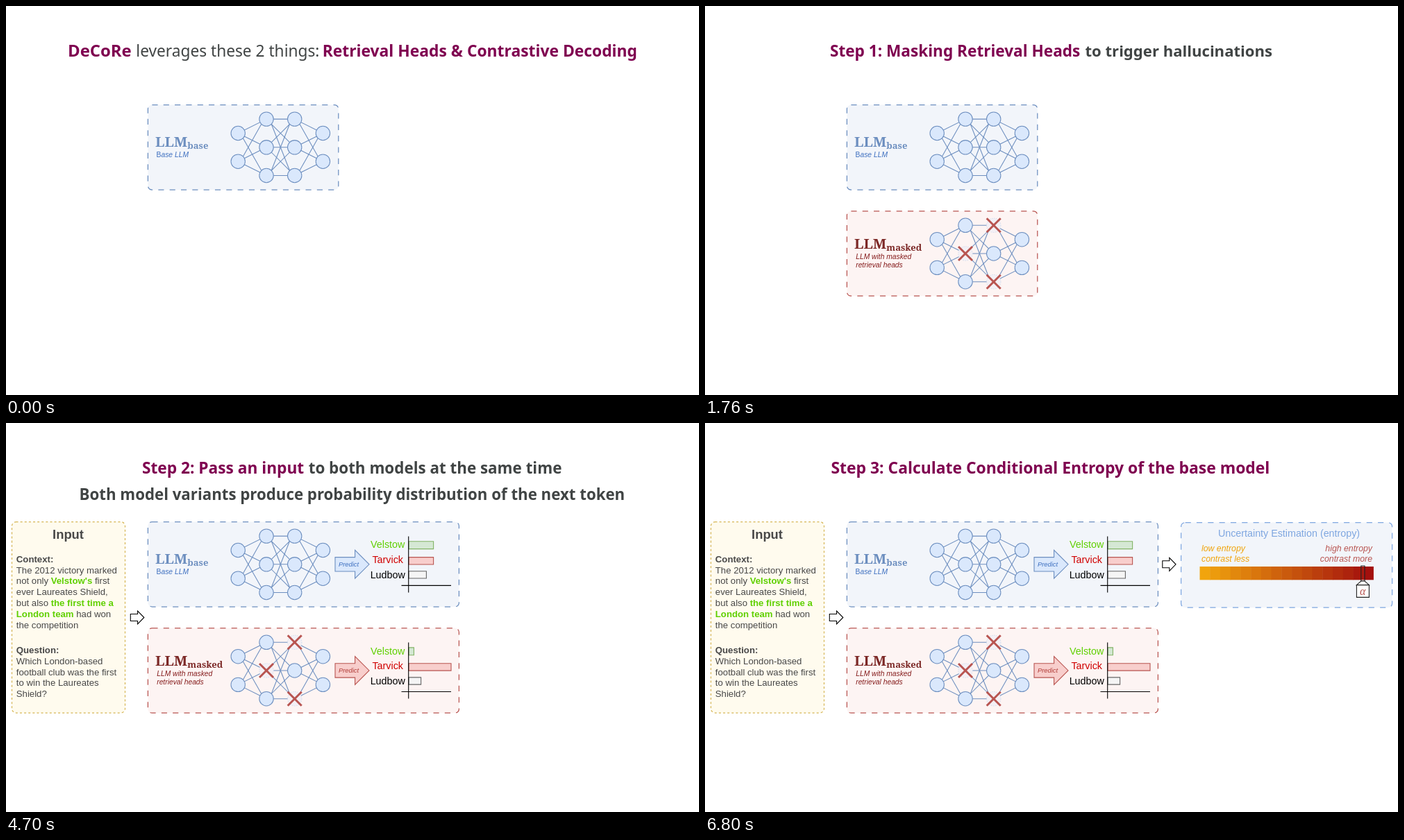
Recreate the animation shown at these times as an HTML page with a canvas. Size 998 px wide and 561 px high, loop 8 s.

```html
<!DOCTYPE html>
<html lang="en">
<head>
<meta charset="utf-8">
<title>DeCoRe steps</title>
<style>
html, body { margin: 0; width: 100%; height: 100%; overflow: hidden; background: #fff; }
canvas { display: block; width: 998px; height: 561px; }
</style>
</head>
<body>
<canvas id="stage"></canvas>
<script>
const W = 998, H = 561, LOOP = 8000;
const CUTS = [500, 2600, 4700, 6800];
const canvas = document.getElementById('stage');
const ctx = canvas.getContext('2d');
const dpr = window.devicePixelRatio || 1;
canvas.width = W * dpr;
canvas.height = H * dpr;

const SANS = '"Liberation Sans", Arial, sans-serif';
const SERIF = '"Liberation Serif", "Times New Roman", serif';
const NAME = '"Noto Serif", "DejaVu Serif", serif';
const HEAD = '"Noto Sans", "Open Sans", sans-serif';
const PLUM = '#7f0050', DARK = '#404444', GREY = '#484848', GREEN = '#5fd000';
const BLUE = { line: '#6c8ebf', panel: '#f2f5fa', fill: '#dae8fc', name: '#6c8ebf', note: '#3f70c0', label: '#3f70c0' };
const RED = { line: '#b85450', panel: '#fdf4f3', fill: '#f8cecc', name: '#7c2826', note: '#851c1c', label: '#b03c38' };

function text(str, x, y, font, color, align = 'left') {
  ctx.font = font;
  ctx.fillStyle = color;
  ctx.textAlign = align;
  ctx.fillText(str, x, y);
  return x + ctx.measureText(str).width;
}

function shape(points, fill, stroke, width = 1.1) {
  ctx.beginPath();
  points.forEach(([x, y]) => ctx.lineTo(x, y));
  ctx.closePath();
  ctx.fillStyle = fill;
  ctx.fill();
  ctx.strokeStyle = stroke;
  ctx.lineWidth = width;
  ctx.stroke();
}

function line(x1, y1, x2, y2, color, width = 1.05) {
  ctx.beginPath();
  ctx.moveTo(x1, y1);
  ctx.lineTo(x2, y2);
  ctx.strokeStyle = color;
  ctx.lineWidth = width;
  ctx.stroke();
}

function box(x, y, w, h, fill, stroke) {
  shape([[x, y], [x + w, y], [x + w, y + h], [x, y + h]], fill, stroke);
}

function panel(x, y, w, h, r, fill, stroke, dash) {
  ctx.beginPath();
  ctx.roundRect(x, y, w, h, r);
  ctx.fillStyle = fill;
  ctx.fill();
  ctx.setLineDash([dash, dash]);
  ctx.strokeStyle = stroke;
  ctx.lineWidth = 1.25;
  ctx.stroke();
  ctx.setLineDash([]);
}

// Block arrow pointing right, centred on y
function arrow(x, neck, tip, y, shaft, head, fill, stroke) {
  shape([[x, y - shaft], [neck, y - shaft], [neck, y - head], [tip, y],
         [neck, y + head], [neck, y + shaft], [x, y + shaft]], fill, stroke);
}

// Steep edges leave and enter the circles at 45 degrees
function edge(xa, ya, xb, yb) {
  const dy = yb - ya;
  const o = Math.abs(dy) > 30 ? 7.2 : 0, s = Math.sign(dy) * o;
  line(xa + o, ya + s, xb - o, yb - s, '#6c8ebf');
}

function network(dy, masked) {
  const layers = [[334.2, [183.5, 224.2]], [375, [163.1, 203.8, 244.5]],
                  [415.7, [163.1, 203.8, 244.5]], [456.4, [183.5, 224.2]]];
  for (let i = 0; i < 3; i++) {
    const [xa, from] = layers[i], [xb, to] = layers[i + 1];
    for (const a of from) for (const b of to) edge(xa, a + dy, xb, b + dy);
  }
  layers.forEach(([x, ys], i) => ys.forEach((y, j) => {
    const off = masked && (i === 1 && j === 1 || i === 2 && j !== 1);
    y += dy;
    ctx.beginPath();
    ctx.arc(x, y, 10.2, 0, 7);
    ctx.fillStyle = off ? '#f4f0f5' : '#dae8fc';
    ctx.fill();
    ctx.strokeStyle = off ? '#d5deee' : '#6c8ebf';
    ctx.lineWidth = 1.05;
    if (off) ctx.setLineDash([1.5, 1.5]);
    ctx.stroke();
    ctx.setLineDash([]);
    if (off) {
      line(x - 10, y - 10, x + 10, y + 10, RED.line, 3);
      line(x - 10, y + 10, x + 10, y - 10, RED.line, 3);
    }
  }));
}

function model(y, skin, sub, nameY, notes, wide, masked) {
  panel(204.4, y, wide ? 448 : 274.4, 122.4, 6, skin.panel, skin.line, 8.16);
  const x = text('LLM', 215, nameY, `bold 20.5px ${NAME}`, skin.name);
  text(sub, x, nameY + 2.3, `bold 13px ${NAME}`, skin.name);
  notes(skin.note);
  network(y - 142.6, masked);
}

function prediction(dy, skin, bars) {
  arrow(474, 502.6, 523, 203.8 + dy, 10.2, 20.4, skin.fill, skin.line);
  text('Predict', 493.5, 206.8 + dy, `italic 9.4px ${SANS}`, skin.label, 'center');
  const rows = [['Velstow', GREEN, 180.4, 170.8, 10.8, '#d5e8d4', '#82b366'],
                ['Tarvick', '#d00000', 202, 193.6, 10.4, '#f8cecc', '#b85450'],
                ['Ludbow', '#000', 224, 213.8, 10.2, '#f5f5f5', '#666']];
  rows.forEach(([name, color, base, top, h, fill, stroke], i) => {
    text(name, 549.7, base + dy, `14.3px ${SANS}`, color, 'center');
    box(580, top + dy, bars[i], h, fill, stroke);
  });
  line(579.7, 163.5 + dy, 579.7, 244.5 + dy, '#000', 1.1);
  line(569.5, 234.4 + dy, 641, 234.4 + dy, '#000', 1.1);
}

// Runs starting with * are bold, with + bold green
function paragraph(lines, y) {
  for (const runs of lines) {
    let x = 14.8;
    for (const run of runs) {
      const mark = '*+'.indexOf(run[0]);
      x = text(mark < 0 ? run : run.slice(1), x, y,
        `${mark < 0 ? '' : 'bold '}13.2px ${SANS}`, mark === 1 ? GREEN : GREY);
    }
    y += 15.8;
  }
}

function input() {
  panel(8.5, 142.6, 163, 275.4, 6, '#fffbee', '#d6b656', 3.06);
  text('Input', 89.5, 166.8, `bold 18.4px ${SANS}`, GREY, 'center');
  paragraph([['*Context:'], ['The 2012 victory marked'], ['not only ', "+Velstow's", ' first'],
    ['ever Laureates Shield,'], ['but also ', '+the first time a'],
    ['+London team', ' had won'], ['the competition']], 200.7);
  paragraph([['*Question:'], ['Which London-based'], ['football club was the first'],
    ['to win the Laureates'], ['Shield?']], 331.9);
  arrow(179.3, 189.6, 198.8, 280.5, 5, 9.5, '#fff', '#000');
}

function entropy() {
  arrow(658.8, 668.8, 678, 203.8, 5, 9.5, '#fff', '#000');
  panel(685.6, 143.6, 304, 122.6, 6, BLUE.panel, '#7ea6e0', 8.16);
  text('Uncertainty Estimation (entropy)', 841, 164.3, `14.3px ${SANS}`, '#7ea6e0', 'center');
  const small = `italic 12.3px ${SANS}`;
  text('low entropy', 715, 185.2, small, '#f0a30a');
  text('contrast less', 715, 200.2, small, '#f0a30a');
  text('high entropy', 961, 185.2, small, RED.line, 'right');
  text('contrast more', 961, 200.2, small, RED.line, 'right');

  const n = 17, w = 250.4 / n;
  for (let i = 0; i < n; i++) {
    const k = i / (n - 1);
    ctx.fillStyle = `rgb(${241 - 78 * k}, ${164 - 148 * k}, 13)`;
    ctx.fillRect(712.5 + i * w, 207, w + (i < n - 1 ? 0.5 : 0), 19.3);
  }
  box(944.8, 206, 5.2, 22, 'transparent', '#222');
  shape([[944.8, 228], [950, 228], [956.4, 233.6], [938.4, 233.6]], '#fff', '#222');
  box(938.4, 233.6, 18, 17.8, '#fff', '#222');
  text('α', 947.2, 247.5, `italic 16px ${SERIF}`, RED.line, 'center');
}

function heading(stage) {
  const bold = (str, x, size, color = PLUM, y = 73) =>
    text(str, x, y, `bold ${size}px ${HEAD}`, color);
  if (stage === 0) {
    bold('DeCoRe', 89, 23.9);
    text('leverages these 2 things:', 187.3, 73, `22.7px ${HEAD}`, DARK);
    bold('Retrieval Heads & Contrastive Decoding', 455.7, 22.85);
  } else if (stage === 1) {
    bold('Step 1: Masking Retrieval Heads', 180, 22.6);
    bold('to trigger hallucinations', 547.5, 22.1, DARK);
  } else if (stage < 4) {
    bold('Step 2: Pass an input', 196, 22.7);
    bold('to both models at the same time', 435.7, 22.4, DARK);
    if (stage === 3) {
      bold('Both model variants produce probability distribution of the next token',
        105.5, 22.25, DARK, 110.7);
    }
  } else {
    bold('Step 3: Calculate Conditional Entropy of the base model', 181.5, 22.9);
  }
}

function draw(stage) {
  ctx.setTransform(dpr, 0, 0, dpr, 0, 0);
  ctx.fillStyle = '#fff';
  ctx.fillRect(0, 0, W, H);
  const wide = stage >= 3, note = `italic 10.3px ${SANS}`;
  heading(stage);
  model(142.6, BLUE, 'base', 203.3, c => {
    const x = text('B', 216.6, 217.8, `10.3px ${SANS}`, c);
    text('ase LLM', x, 217.8, note, c);
  }, wide, false);
  if (stage >= 1) {
    model(295.8, RED, 'masked', 350.3, c => {
      text('LLM with masked', 217.2, 365, note, c);
      text('retrieval heads', 217.2, 377, note, c);
    }, wide, true);
  }
  if (stage >= 2) input();
  if (wide) {
    prediction(0, BLUE, [35.6, 35.6, 25.4]);
    prediction(153.1, RED, [7.4, 61, 17.6]);
  }
  if (stage === 4) entropy();
}

const start = performance.now();
let shown = -1;
function tick() {
  const t = (performance.now() - start) % LOOP;
  const stage = CUTS.filter(c => t >= c).length;
  if (stage !== shown) draw(shown = stage);
  requestAnimationFrame(tick);
}
tick();
</script>
</body>
</html>
```
